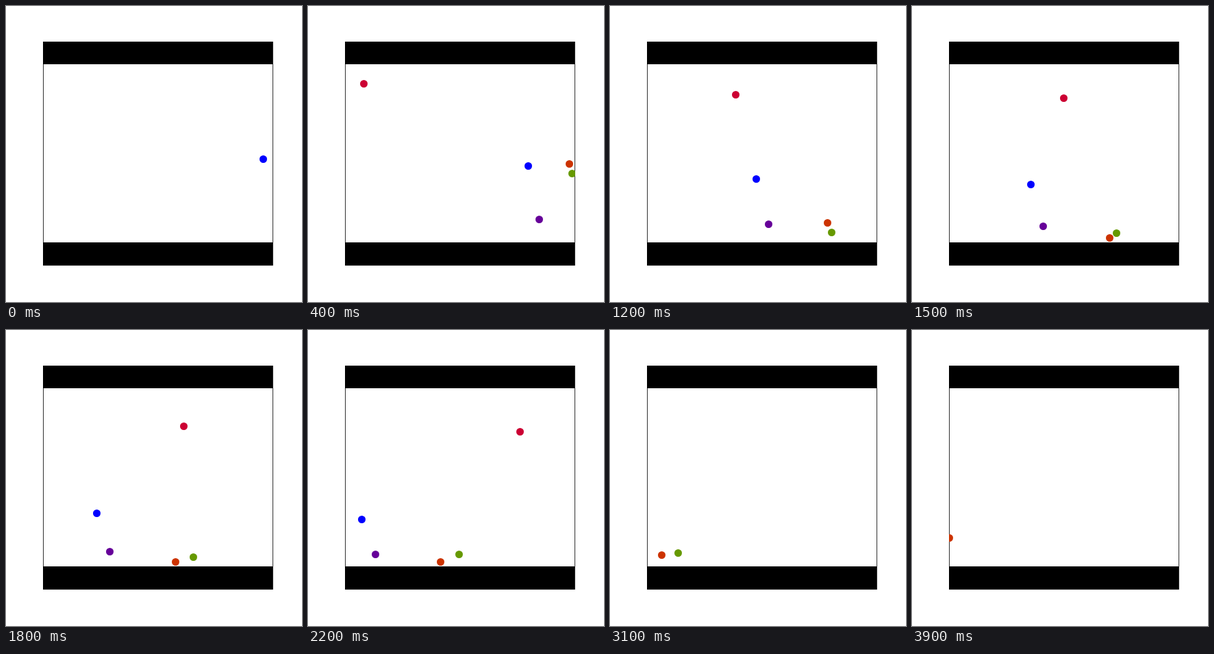
Recreate the animation shown at these times as an HTML page with a canvas. Size 432 by 432 pixels, loop 4000 ms.

```html
<!DOCTYPE html>
<html>
<head>
<meta charset="utf-8">
<style>
  html, body { margin: 0; width: 100%; height: 100%; overflow: hidden; background: #fff; }
  canvas { display: block; }
</style>
</head>
<body>
<canvas id="stage" width="432" height="432"></canvas>
<script>
const ctx = document.getElementById('stage').getContext('2d');
const STEP = 100, STEPS = 40, RADIUS = 5.5;
const LEFT = 54, TOP = 52, WIDTH = 335, HEIGHT = 326, WALL = 33;

// A walker appears at step `born` and walks straight legs: [until step, dx, dy per step].
const walkers = [
  { color: '#0000ff', born: 0, x: 375.5, y: 223.9, legs: [[23, -13.5, 2.41]] },
  { color: '#660099', born: 1, x: 377.5, y: 309.2, legs: [[25, -13.28, 0.87]] },
  { color: '#cc0033', born: 2, x: 56.5, y: 109.9, legs: [[28, 12.66, 1.92]] },
  { color: '#cc3300', born: 3, x: 389.5, y: 219.8,
    legs: [[14, -8, 10.75], [23, -13.45, 0], [31, -13.12, -1.2], [36, -3.1, 1.15], [39, -1.9, -10.25]] },
  { color: '#669900', born: 4, x: 385.5, y: 244.5,
    legs: [[12, -7.75, 10.75], [18, -8.33, 0.17], [22, -13.25, -1], [34, -13.44, -0.22]] }
];

// Returns the snapped pixel centre, or null when the walker is not in the corridor.
function positionAt({ born, x, y, legs }, step) {
  if (step < born) return null;
  let from = born;
  for (const [until, dx, dy] of legs) {
    const steps = Math.min(step, until) - from;
    x += dx * steps;
    y += dy * steps;
    if (step <= until) return [Math.floor(x) + 0.5, Math.floor(y) + 0.5];
    from = until;
  }
  return null;
}

function drawCorridor() {
  ctx.fillStyle = '#fff';
  ctx.fillRect(0, 0, 432, 432);
  ctx.fillStyle = '#000';
  ctx.fillRect(LEFT, TOP, WIDTH, WALL);
  ctx.fillRect(LEFT, TOP + HEIGHT - WALL, WIDTH, WALL);
  ctx.lineWidth = 0.8;
  ctx.strokeRect(LEFT + 0.5, TOP + 0.5, WIDTH, HEIGHT);
}

function drawWalkers(step) {
  ctx.save();
  ctx.beginPath();
  ctx.rect(LEFT, TOP, WIDTH + 1, HEIGHT + 1);
  ctx.clip();
  for (const walker of walkers) {
    const position = positionAt(walker, step);
    if (!position) continue;
    ctx.fillStyle = walker.color;
    ctx.beginPath();
    ctx.arc(...position, RADIUS, 0, 2 * Math.PI);
    ctx.fill();
  }
  ctx.restore();
}

const start = performance.now();
function tick() {
  drawCorridor();
  drawWalkers(Math.floor((performance.now() - start) / STEP) % STEPS);
  requestAnimationFrame(tick);
}
tick();
</script>
</body>
</html>
```
